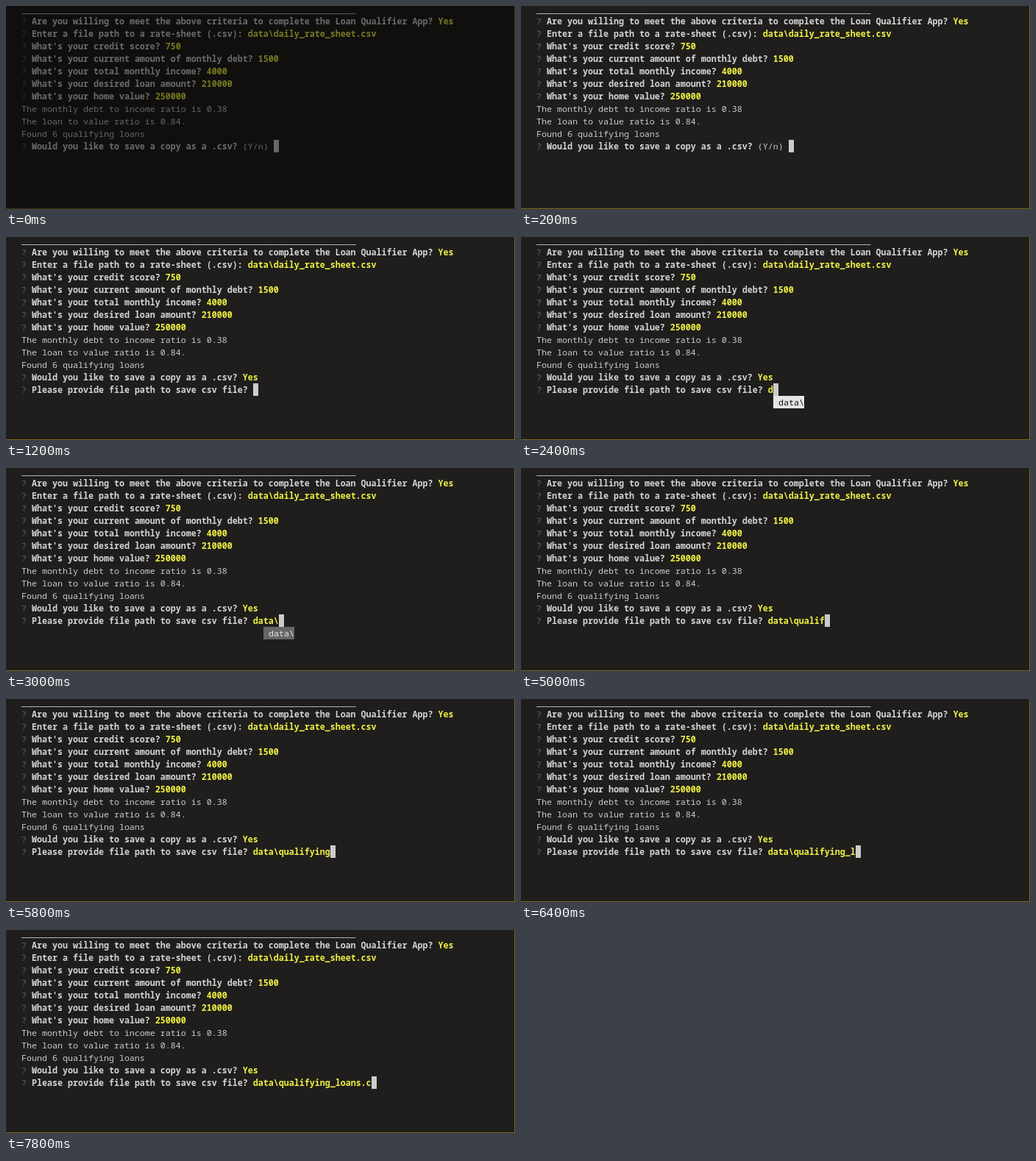
Write an HTML page that moves like this. It is 692 by 276 pixels and loops after 8 s.

```html
<!DOCTYPE html>
<html lang="en">
<head>
<meta charset="utf-8">
<title>Loan qualifier terminal</title>
<style>
  html, body { margin: 0; width: 100%; height: 100%; overflow: hidden; background: #000; }
  #screen {
    position: relative; width: 692px; height: 276px; overflow: hidden;
    background: #1f1e1c; box-shadow: inset -1px -1px #7d6516;
  }
  pre, #menu {
    position: absolute; margin: 0; color: #ccc; white-space: pre;
    font: 500 calc(7px / .6)/17px "Noto Sans Mono", "DejaVu Sans Mono", monospace;
  }
  pre { left: 21px; top: -5px; }
  b { color: #d4d4d4; font-weight: 700; }
  i { color: #666; font-style: normal; }
  em { color: #f0f045; font-style: normal; font-weight: 700; }
  u { position: relative; top: 1px; text-decoration: none; }
  #cursor { position: absolute; width: 7px; height: 17px; background: #ccc; }
  #menu { top: 216px; width: 42px; height: 17px; background: #e5e5e5; color: #111; }
  #menu.selected { background: #666; color: #e5e5e5; }
</style>
</head>
<body>
<div id="screen">
  <pre id="text"></pre>
  <div id="cursor"></div>
  <div id="menu"> data\</div>
</div>
<script>
const LOOP = 8000, LEFT = 21, TOP = -5, CELL = 7, ROW = 17;
const $ = id => document.getElementById(id);
const ask = (question, reply = "") => `<i>?</i> <b>${question}</b> ${reply}`;
const answered = (question, answer) => ask(question, `<em>${answer}</em>`);

const history = [
  `<u>${"_".repeat(65)}</u>`,
  answered("Are you willing to meet the above criteria to complete the Loan Qualifier App?", "Yes"),
  answered("Enter a file path to a rate-sheet (.csv):", "data\\daily_rate_sheet.csv"),
  answered("What's your credit score?", "750"),
  answered("What's your current amount of monthly debt?", "1500"),
  answered("What's your total monthly income?", "4000"),
  answered("What's your desired loan amount?", "210000"),
  answered("What's your home value?", "250000"),
  "The monthly debt to income ratio is 0.38",
  "The loan to value ratio is 0.84.",
  "Found 6 qualifying loans",
];
const saveQuestion = "Would you like to save a copy as a .csv?";
const pathQuestion = "Please provide file path to save csv file?";
const path = "data\\qualifying_loans.csv";

// [time in ms, characters of the path entered]
const typing = [
  [1000, 0], [2400, 1], [2600, 2], [3000, 5], [4200, 6], [4400, 7], [4600, 9],
  [4800, 10], [5000, 11], [5200, 12], [5400, 13], [5800, 15], [6200, 16],
  [6400, 17], [6600, 18], [6800, 20], [7200, 21], [7600, 22], [7800, 23],
];

function placeCursor(column, row) {
  $("cursor").style.left = LEFT + column * CELL + "px";
  $("cursor").style.top = TOP + row * ROW + "px";
}

let shown;
function render(t) {
  const step = typing.findLast(([time]) => t >= time);
  const count = step ? step[1] : -1;
  $("screen").style.filter = t < 200 ? "brightness(.5)" : "none";
  if (count === shown) return;
  shown = count;

  const prompts = step
    ? [answered(saveQuestion, "Yes"), answered(pathQuestion, path.slice(0, count))]
    : [ask(saveQuestion, "(Y/n) ")];
  $("text").innerHTML = [...history, ...prompts].join("\n");

  const pathColumn = pathQuestion.length + 3;
  if (step) placeCursor(pathColumn + count, 12);
  else placeCursor(saveQuestion.length + 9, 11);

  // Completion stays where it opened once it has been accepted.
  const menu = $("menu");
  menu.hidden = count < 1 || count > 5;
  menu.className = count === 5 ? "selected" : "";
  menu.style.left = LEFT + (pathColumn + Math.min(count, 2)) * CELL + "px";
}

const start = performance.now();
function frame() {
  render((performance.now() - start) % LOOP);
  requestAnimationFrame(frame);
}
render(0);
requestAnimationFrame(frame);
</script>
</body>
</html>
```
